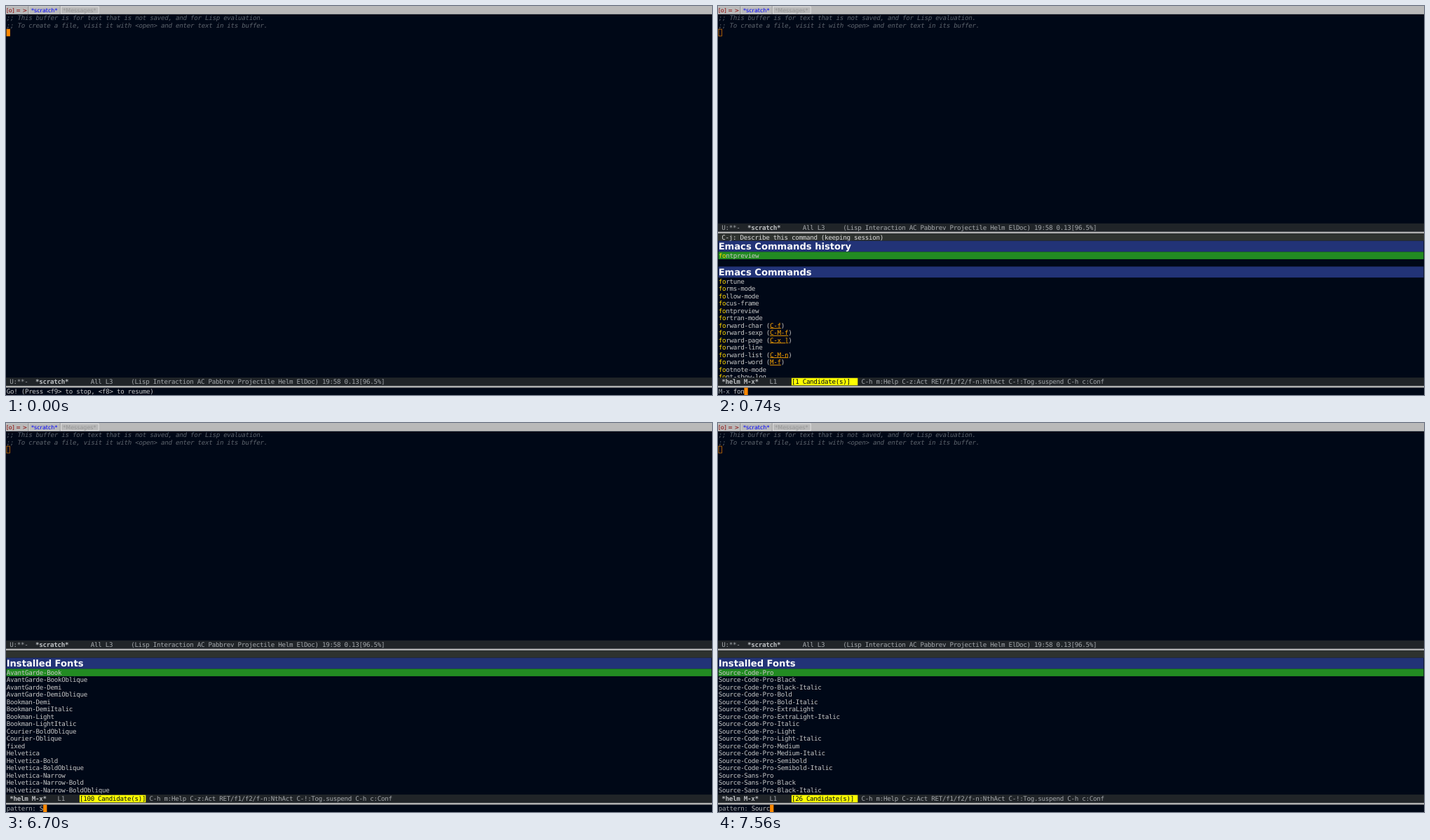
An HTML page that plays this animation: 1007x556 px, repeating every 8 s.

```html
<!DOCTYPE html>
<html lang="en">
<head>
<meta charset="utf-8">
<title>Font preview session</title>
<style>
  html, body { margin: 0; width: 100%; height: 100%; overflow: hidden; background: #000817; }
  svg { display: block; width: 100vw; height: 100vh; }
  text {
    font: 14px "DejaVu Sans Mono", "Noto Sans Mono", monospace;
    letter-spacing: calc(8px - .602em);
    white-space: pre;
    text-rendering: geometricPrecision;
    fill: #c6c6c6;
  }
  .comment { font-style: italic; fill: #5c636c; }
  .mode { fill: #a3a7ab; }
  .bold { font-weight: bold; fill: #bcbfc2; }
  .prompt { fill: #a2a6aa; }
  .head { fill: #dedede; }
  .match { fill: #ffd700; }
  .key { fill: #ffa500; text-decoration: underline; }
  .count, .under { fill: #000817; }
  .title { font: bold 20px "DejaVu Sans", sans-serif; letter-spacing: 0; fill: #fff; }
  .tab { font: 12.2px "DejaVu Sans", sans-serif; letter-spacing: 0; }
</style>
</head>
<body>
<svg id="stage" viewBox="0 0 1536 848" preserveAspectRatio="none"></svg>
<script>
const W = 1536, CELL = 8, ROW = 16, LOOP = 8000;
const ORANGE = '#ff8800';

const esc = s => s.replace(/&/g, '&amp;').replace(/</g, '&lt;');
const rect = (x, y, w, h, fill) =>
  `<rect x="${x}" y="${y}" width="${w}" height="${h}" fill="${fill}"/>`;
const outline = (x, y, w, h, color) =>
  `<rect x="${x + .5}" y="${y + .5}" width="${w - 1}" height="${h - 1}" fill="none" stroke="${color}"/>`;
const span = (s, cls) => `<tspan class="${cls}">${esc(s)}</tspan>`;
const markup = (x, y, inner, cls = '') => `<text x="${x}" y="${y}" class="${cls}">${inner}</text>`;
const label = (x, y, s, cls) => markup(x, y, esc(s), cls);

const words = s => s.trim().split('\n').map(line => line.trim());
const family = (base, styles) => [base, ...styles.split(' ').filter(Boolean).map(s => `${base}-${s}`)];

const allCommands = words(`
  enable-theme
  magit-submodule-update
  url-setup-privacy-info
  dired-backup-diff
  gnus-summary-recenter
  dired-at-point
  emms-playlist-limit-to-info-performer
  bibtex-SuppCollection
  digit-argument (C-9)
  ibuffer-update
  org-babel-examplify-region
  gnus-summary-catchup-from-here
  helm-grep-mode-jump-other-window-forward`);
const foCommands = words(`
  fortune
  forms-mode
  follow-mode
  focus-frame
  fontpreview
  fortran-mode
  forward-char (C-f)
  forward-sexp (C-M-f)
  forward-page (C-x ])
  forward-line
  forward-list (C-M-n)
  forward-word (M-f)
  footnote-mode
  font-show-log`);
const fontCommands = words(`
  fontpreview
  font-show-log
  font-lock-mode
  fontpreview-mode
  fontpreview-quit
  fontpreview-next-font
  font-lock-fontify-block (M-o M-o)
  font-lock-fontify-buffer
  fontpreview-set-frame-font
  fontpreview-copy-font-name
  fontpreview-copy-font-path
  menu-set-font
  describe-font
  set-face-font`);
const firstFonts = [
  ...['Book', 'BookOblique', 'Demi', 'DemiOblique'].map(s => 'AvantGarde-' + s),
  ...['Demi', 'DemiItalic', 'Light', 'LightItalic'].map(s => 'Bookman-' + s),
  'Courier-BoldOblique', 'Courier-Oblique', 'fixed',
  ...family('Helvetica', 'Bold BoldOblique Narrow Narrow-Bold Narrow-BoldOblique')
];
const sFonts = [
  ...family('DejaVu-Sans', 'Bold Bold-Oblique Condensed Condensed-Bold Condensed-Oblique ' +
    'ExtraLight Mono Mono-Bold Mono-Bold-Oblique Mono-Oblique Oblique'),
  ...family('DejaVu-Serif', 'Bold Bold-Italic Condensed Italic')
];
const soFonts = [
  'GFSSolomos-Regular', 'Noto-Sans-Old-South-Arabian-Regular',
  ...family('Source-Code-Pro', 'Black Black-Italic Bold Bold-Italic ExtraLight ExtraLight-Italic ' +
    'Italic Light Light-Italic Medium Medium-Italic Semibold Semibold-Italic'),
  ...family('Source-Sans-Pro', 'Black Black-Italic')
];

const commands = (at, input, match, history, list, cursor) => ({
  at, prompt: 'M-x ', input, match, cursor, count: history.length,
  help: ' C-j: Describe this command (keeping session)',
  groups: [['Emacs Commands history', history], ['Emacs Commands', list]]
});
const fonts = (at, input, count, list) => ({
  at, prompt: 'pattern: ', input, count, help: '',
  groups: [['Installed Fonts', list.slice(0, 17)]]
});

const recent = ['fontpreview'];
const states = [
  { at: 0 },
  commands(500, 'f', '', ['gif-screencast', 'fontpreview'], allCommands),
  commands(670, 'fo', 'fo', recent, foCommands),
  commands(740, 'fon', 'fo', recent, foCommands),
  commands(900, 'font', 'fon', recent, fontCommands),
  commands(1950, 'font', 'font', recent, fontCommands, 0),
  fonts(6700, 'S', 100, firstFonts),
  fonts(6860, 'So', 100, sFonts),
  fonts(7050, 'Sou', 29, soFonts),
  fonts(7230, 'Sour', 27, soFonts.slice(1)),
  fonts(7560, 'Sourc', 26, soFonts.slice(2))
];

function tabBar() {
  return rect(0, 0, W, 18, '#b9b9b9') +
    outline(0, 0, 48, 17, '#c9c9c9') +
    label(1, 13, '[o] = >', 'tab" style="fill:#8b0000') +
    rect(48, 1, 1, 16, '#777') +
    outline(50, 1, 67, 16, '#dcdcdc') +
    label(55, 13, '*scratch*', 'tab" style="fill:#0000ff') +
    rect(117, 1, 1, 16, '#777') +
    outline(119, 1, 83, 16, '#f4f4f4') +
    label(124, 13, '*Messages*', 'tab" style="fill:#969696');
}

function modeLine(y, inner) {
  return rect(0, y, W, 18, '#202428') + markup(0, y + 14, inner, 'mode') +
    rect(0, y + 18, W, 4, '#b0b0b0');
}

function scratch(modeY, active) {
  return label(1, 31, ';; This buffer is for text that is not saved, and for Lisp evaluation.', 'comment') +
    label(1, 47, ';; To create a file, visit it with <open> and enter text in its buffer.', 'comment') +
    (active ? rect(1, 50, CELL, ROW, ORANGE) : outline(1, 50, CELL, ROW, ORANGE)) +
    modeLine(modeY, ' U:**-  ' + span('*scratch*', 'bold') +
      '      All L3     (Lisp Interaction AC Pabbrev Projectile Helm ElDoc) 19:58 0.13[96.5%]');
}

function candidate(s, match) {
  const [, name, key] = s.match(/^(\S+)(?: \((.+)\))?$/);
  const shown = match ? name.replaceAll(match, span(match, 'match')) : name;
  return key ? `${shown} (${span(key, 'key')})` : shown;
}

function helm({ groups, match, count, help }) {
  let y = 512;
  let out = rect(0, 496, W, ROW, '#2e322f') + label(0, 509, help, 'head');
  groups.forEach(([title, list], g) => {
    if (g) y += ROW;
    out += rect(1, y, W - 2, 24, '#223377') + label(1, y + 19, title, 'title');
    y += 24;
    list.forEach((s, i) => {
      if (!g && !i) out += rect(1, y, W - 2, ROW, '#228b22');
      out += markup(1, y + 13, candidate(s, match));
      y += ROW;
    });
  });
  const total = `[${count} Candidate(s)]`;
  return out + modeLine(810, ' ' + span('*helm M-x*', 'bold') + '   L1' + ' '.repeat(23) +
      'C-h m:Help C-z:Act RET/f1/f2/f-n:NthAct C-!:Tog.suspend C-h c:Conf') +
    rect(20 * CELL, 811, 18 * CELL, 16, '#ffff00') + label(20 * CELL, 824, total, 'count');
}

function minibuffer({ prompt, input, cursor }) {
  const line = prompt + input;
  const col = cursor ?? line.length;
  const x = 1 + col * CELL;
  return markup(1, 845, span(prompt, 'prompt') + esc(input)) +
    rect(x, 832, CELL, ROW, ORANGE) + label(x, 845, line[col] || '', 'under');
}

function draw(state) {
  const open = !!state.groups;
  return rect(0, 0, W, 848, '#000817') + tabBar() + (open
    ? scratch(474, false) + helm(state) + minibuffer(state)
    : scratch(810, true) + label(1, 845, 'Go! (Press <f9> to stop, <f8> to resume)'));
}

const stage = document.getElementById('stage');
const start = performance.now();
let shown;

function update() {
  const t = (performance.now() - start) % LOOP;
  const state = states.findLast(s => s.at <= t);
  if (state !== shown) stage.innerHTML = draw(shown = state);
  requestAnimationFrame(update);
}
update();
</script>
</body>
</html>
```
